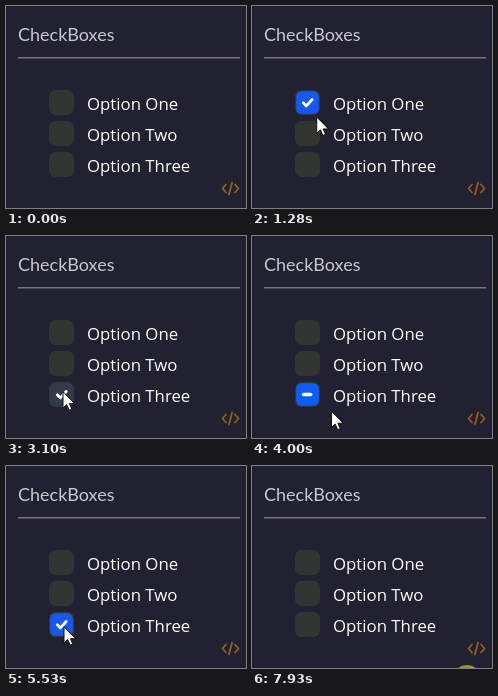
Recreate the animation shown at these times as an HTML page with a canvas. Size 240x202 px, loop 8030 ms.

```html
<!DOCTYPE html>
<html lang="en">
<head>
<meta charset="utf-8">
<title>CheckBoxes</title>
<style>
  html, body { margin: 0; width: 100%; height: 100%; overflow: hidden; background: #222131; }
  canvas { display: block; width: 240px; height: 202px; }
</style>
</head>
<body>
<canvas id="stage"></canvas>
<script>
const LOOP = 8030, W = 240, H = 202;
const canvas = document.getElementById('stage');
const ctx = canvas.getContext('2d');
const ratio = window.devicePixelRatio || 1;
canvas.width = W * ratio;
canvas.height = H * ratio;

const OFF = 0, ON = 1, MIXED = 2;
const GREY = [51, 53, 51], GREY_HOVER = [54, 56, 56];
const BLUE = [13, 92, 255], BLUE_HOVER = [24, 88, 236];
const FADE = 150;

// Each change is [time, new state].
const boxes = [
  { y: 84, label: 'Option One', changes: [[700, ON], [2290, OFF]] },
  { y: 115, label: 'Option Two', changes: [[1530, ON], [2640, OFF]] },
  { y: 146, label: 'Option Three', changes: [
    [3085, ON], [3470, MIXED], [4370, OFF], [5300, ON], [6240, MIXED], [7010, OFF]] }
];

// Pointer moves: [start, end, x, y, easing]; it rests between them.
const moves = [
  [100, 430, 70, 91, 'out'],
  [920, 1380, 64, 114, 'both'],
  [2149, 2150, 62.5, 98, 'both'],
  [2370, 2560, 57, 128, 'both'],
  [2740, 2930, 57, 156, 'both'],
  [3600, 3810, 75, 173, 'both'],
  [3840, 3990, 79.5, 175.5, 'out'],
  [4130, 4280, 58, 160, 'both'],
  [4440, 4620, 77, 175, 'both'],
  [4790, 5130, 58, 161, 'both'],
  [7130, 7580, 152, 204, 'in']
];
const START = { x: 190, y: 204 };
const presses = [[600, 700], [1450, 1530], [2220, 2290], [2560, 2640], [3030, 3085],
  [3400, 3470], [4290, 4370], [5220, 5300], [6150, 6240], [6930, 7010]];
const LAST_PRESS = 7930;

const ease = {
  in: k => k * k,
  out: k => 1 - (1 - k) ** 2,
  both: k => k * k * (3 - 2 * k)
};
const clamp = v => Math.max(0, Math.min(1, v));
const mix = (a, b, k) => a.map((v, i) => v + (b[i] - v) * k);
const rgb = c => `rgb(${c.map(Math.round).join(',')})`;

function pointerAt(t) {
  let { x, y } = START;
  for (const [from, to, nx, ny, kind] of moves) {
    if (t < from) break;
    const k = ease[kind](clamp((t - from) / (to - from)));
    x += (nx - x) * k;
    y += (ny - y) * k;
  }
  return { x, y };
}

// Share of the recent past that the pointer spent over the box.
function hoverAt(box, t) {
  let hits = 0;
  for (let i = 0; i < 10; i++) {
    const p = pointerAt(t - i * FADE / 10);
    if (p.x >= 43 && p.x <= 69 && p.y >= box.y && p.y <= box.y + 25) hits++;
  }
  return hits / 10;
}

function stateAt(box, t) {
  let state = OFF, fill = 0;
  for (const [time, next] of box.changes) {
    if (t < time) break;
    fill += ((next === OFF ? 0 : 1) - fill) * clamp((t - time) / FADE);
    state = next;
  }
  return { state, fill };
}

function line(points, color, width) {
  ctx.beginPath();
  points.forEach(([x, y]) => ctx.lineTo(x, y));
  ctx.strokeStyle = color;
  ctx.lineWidth = width;
  ctx.stroke();
}

function text(str, x, y, font, color) {
  ctx.font = font;
  ctx.fillStyle = color;
  ctx.fillText(str, x, y);
}

function square(x, y, size, radius, color) {
  ctx.fillStyle = rgb(color);
  ctx.beginPath();
  ctx.roundRect(x, y, size, size, radius);
  ctx.fill();
}

function drawBox(box, t) {
  const { state, fill } = stateAt(box, t);
  const hover = hoverAt(box, t);
  const rim = mix(GREY, GREY_HOVER, hover);
  square(43, box.y, 25, 6.5, rim);
  square(44.2, box.y + 1.2, 22.6, 5.3, mix(rim, mix(BLUE, BLUE_HOVER, hover), fill));

  const y = box.y + 12.5;
  if (state === ON) line([[51.3, y + 0.3], [54.4, y + 3.4], [60.2, y - 3]], '#fff', 2.8);
  if (state === MIXED) line([[51.7, y], [58.7, y]], '#fff', 3.6);
  text(box.label, 81, box.y + 20, '16.8px "Open Sans", "Noto Sans", sans-serif', '#fff');
}

function drawCodeIcon() {
  const color = '#90601f';
  line([[220, 178.5], [216.5, 182.5], [220, 186.5]], color, 1.8);
  line([[229, 178.5], [232.5, 182.5], [229, 186.5]], color, 1.8);
  line([[226.1, 176.5], [222.9, 188.5]], color, 1.8);
}

function drawSpot(x, y) {
  ctx.fillStyle = 'rgba(240, 230, 10, 0.6)';
  ctx.beginPath();
  ctx.arc(x, y, 15, 0, Math.PI * 2);
  ctx.fill();
}

function drawPointer({ x, y }) {
  ctx.save();
  ctx.translate(x, y);
  ctx.beginPath();
  [[0, 0], [0, 16], [3.7, 12.6], [6.2, 18.2], [8.8, 17], [6.4, 11.7], [11.5, 11.7]]
    .forEach(([px, py]) => ctx.lineTo(px, py));
  ctx.closePath();
  ctx.fillStyle = '#fff';
  ctx.fill();
  ctx.strokeStyle = '#111';
  ctx.lineWidth = 1;
  ctx.stroke();
  ctx.restore();
}

function draw(t) {
  ctx.setTransform(ratio, 0, 0, ratio, 0, 0);
  ctx.lineCap = ctx.lineJoin = 'round';
  ctx.fillStyle = '#222131';
  ctx.fillRect(0, 0, W, H);

  text('CheckBoxes', 12, 35, '18px Lato, sans-serif', '#c9c9cd');
  ctx.fillStyle = '#767573';
  ctx.fillRect(12, 51, 222, 1.5);
  boxes.forEach(box => drawBox(box, t));
  drawCodeIcon();

  const pointer = pointerAt(t);
  if (presses.some(([down, up]) => t >= down && t < up)) drawSpot(pointer.x, pointer.y);
  if (t >= LAST_PRESS) drawSpot(215, 214);
  if (t >= 130 && t < 7570) drawPointer(pointer);
}

function tick() {
  draw(performance.now() % LOOP);
  requestAnimationFrame(tick);
}
tick();
</script>
</body>
</html>
```
